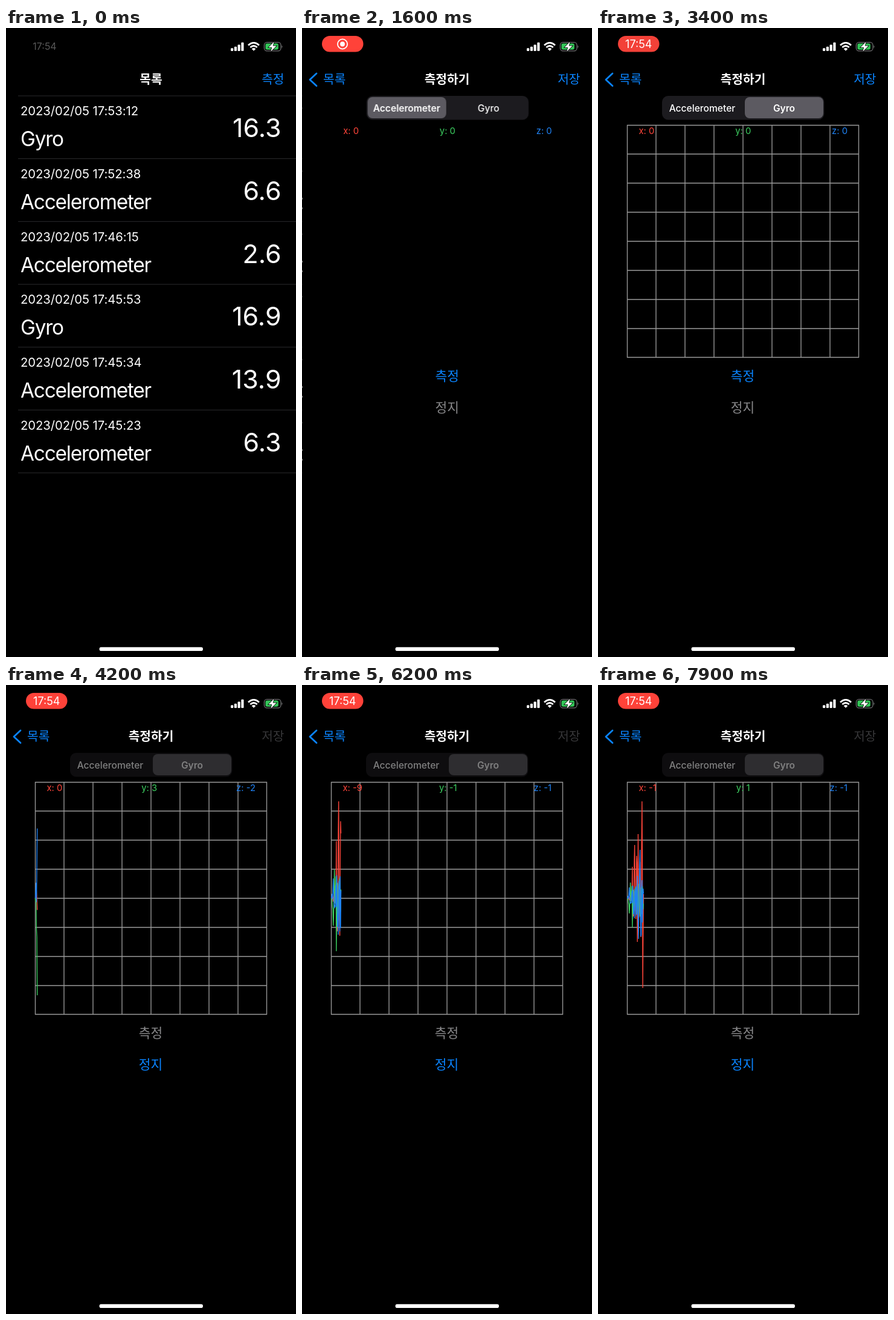
An HTML page that plays this animation: 480 px wide and 1038 px high, repeating every 8 s.

```html
<!DOCTYPE html>
<html lang="ko">
<head>
<meta charset="utf-8">
<title>측정</title>
<style>
  html, body { margin: 0; width: 100%; height: 100%; overflow: hidden; background: #000; }
  svg { display: block; width: 480px; height: 1038px; }
  text {
    font-family: Inter, "Noto Sans CJK KR", "Noto Sans CJK", sans-serif;
    font-optical-sizing: none;
    fill: #fff;
    white-space: pre;
  }
  .mid { text-anchor: middle; }
  .end { text-anchor: end; }
  .blue { fill: #0a84ff; }
  .ko { font-family: "Noto Sans CJK KR", "Noto Sans CJK", sans-serif; font-size: 20.3px; }
  .bold { font-weight: 700; }
  .button { font-size: 21.4px; }
  .date { font-size: 20.3px; letter-spacing: -.07px; }
  .name { font-size: 33.4px; letter-spacing: -.036em; }
  .value { font-size: 43px; }
  .axis { font-size: 14.8px; }
  .segment text { font-size: 15.6px; font-weight: 500; }

  .anim { animation: 8s linear infinite both; }
  .pill, .clock { transform-box: fill-box; transform-origin: center; }

  .clock { animation-name: clock; }
  @keyframes clock { 0% { opacity: .35 } 2%, 100% { opacity: 0; transform: scale(.9) } }
  .pill { animation-name: pill; }
  @keyframes pill {
    0%, 2% { opacity: 0; transform: scale(.6) }
    7%, 100% { opacity: 1; transform: none }
  }
  .pulse { animation: pulse 2s -.95s linear infinite; }
  @keyframes pulse { 0%, 100% { fill: #d63d35 } 25%, 75% { fill: #ff4239 } }
  .record { animation-name: record; }
  @keyframes record { 0%, 34% { opacity: 1 } 37%, 100% { opacity: 0 } }
  .time { animation-name: time; }
  @keyframes time { 0%, 35% { opacity: 0 } 38%, 100% { opacity: 1 } }

  .push { animation-timing-function: cubic-bezier(.28, .82, .32, 1); }
  .list { animation-name: list; }
  @keyframes list {
    0%, 14.375% { transform: none; opacity: 1 }
    20.625%, 100% { transform: translateX(-144px); opacity: .85 }
  }
  .detail { animation-name: detail; }
  @keyframes detail { 0%, 14.375% { transform: translateX(480px) } 20.625%, 100% { transform: none } }
  .old-title { animation-name: oldTitle; }
  @keyframes oldTitle {
    0%, 14.375% { transform: none; opacity: 1 }
    18.5%, 100% { transform: translateX(-186px); opacity: 0 }
  }
  .new-title { animation-name: newTitle; }
  @keyframes newTitle {
    0%, 14.375% { transform: translateX(200px); opacity: 0 }
    19.5%, 100% { transform: none; opacity: 1 }
  }
  .back { animation-name: back; }
  @keyframes back {
    0%, 14.375% { transform: translateX(110px); opacity: 0 }
    19.5%, 100% { transform: none; opacity: 1 }
  }
  .chevron, .save { animation-name: appear; }
  @keyframes appear { 0%, 15% { opacity: 0 } 19%, 100% { opacity: 1 } }
  .measure { animation-name: measure; }
  @keyframes measure {
    0%, 11.5% { opacity: 1 }
    13%, 15% { opacity: .4 }
    18%, 100% { opacity: 0 }
  }

  .chart { animation-name: chart; animation-timing-function: step-end; }
  @keyframes chart { 0% { visibility: hidden } 21%, 100% { visibility: visible } }
  .thumb { animation-name: thumb; animation-timing-function: ease-out; }
  @keyframes thumb { 0%, 28.75% { transform: none } 32%, 100% { transform: translateX(135px) } }
  .left, .right { animation-timing-function: step-end; }
  .left { animation-name: left; }
  @keyframes left { 0% { font-weight: 600 } 29%, 100% { font-weight: 500 } }
  .right { animation-name: right; }
  @keyframes right { 0% { font-weight: 500 } 29%, 100% { font-weight: 600 } }

  /* controls swap when measuring begins */
  .segment, .start, .stop, .save text { animation-timing-function: step-end; }
  .segment { animation-name: dim; }
  @keyframes dim { 0% { opacity: 1 } 45.7%, 100% { opacity: .5 } }
  .start { animation-name: start; }
  @keyframes start { 0% { fill: #0a84ff } 45.7%, 100% { fill: #88888a } }
  .stop { animation-name: stop; }
  @keyframes stop { 0% { fill: #88888a } 45.7%, 100% { fill: #0a84ff } }
  .save text { animation-name: save; }
  @keyframes save { 0% { fill: #0a84ff } 45.7%, 100% { fill: #363638 } }
</style>
</head>
<body>
<svg viewBox="0 0 480 1038">
  <g class="list anim push" id="list"></g>

  <g class="detail anim push">
    <rect y="100" width="480" height="938"/>
    <g class="segment anim">
      <rect x="106" y="112" width="268.5" height="39.5" rx="10" fill="#1c1b1f"/>
      <rect class="thumb anim" x="108" y="114" width="130" height="35" rx="8" fill="#5c5a61"/>
      <text class="mid left anim" x="172.5" y="137.5">Accelerometer</text>
      <text class="mid right anim" x="308" y="137.5">Gyro</text>
    </g>
    <g class="chart anim" fill="none" stroke-width="1.35">
      <path id="grid" stroke="#9a9a9a"/>
      <g id="lines" stroke-linejoin="bevel"></g>
    </g>
    <g id="axes"></g>
    <text class="ko button mid start anim" x="239.5" y="581.7">측정</text>
    <text class="ko button mid stop anim" x="239.5" y="633.7">정지</text>
  </g>

  <g>
    <text class="ko bold mid old-title anim push" x="240" y="92.3">목록</text>
    <text class="ko blue end measure anim" x="460.5" y="92.3">측정</text>
    <path class="chevron anim" d="M24 75L13 85.3L24 95.6" fill="none" stroke="#0a84ff" stroke-width="2.8" stroke-linecap="round" stroke-linejoin="round"/>
    <text class="ko blue back anim push" x="35" y="92.3">목록</text>
    <text class="ko bold mid new-title anim push" x="240" y="92.3">측정하기</text>
    <g class="save anim"><text class="ko end anim" x="460.5" y="92.3">저장</text></g>
  </g>

  <g>
    <text class="mid clock anim" x="64" y="36.5" font-size="16">17:54</text>
    <g class="pill anim">
      <rect class="pulse" x="33" y="13" width="68.5" height="26.5" rx="13.2"/>
      <g class="record anim">
        <circle cx="67" cy="26.5" r="8.1" fill="none" stroke="#fff" stroke-width="1.8"/>
        <circle cx="67" cy="26.5" r="3.9" fill="#fff"/>
      </g>
      <text class="mid time anim" x="67.3" y="33" font-size="18">17:54</text>
    </g>
    <g fill="#fff">
      <rect x="372" y="33.3" width="4.2" height="4.7" rx="1.2"/>
      <rect x="377.8" y="30.8" width="4.2" height="7.2" rx="1.2"/>
      <rect x="383.5" y="27.6" width="4.2" height="10.4" rx="1.2"/>
      <rect x="389.3" y="23.8" width="4.2" height="14.2" rx="1.2"/>
      <path d="M410 37.8L406.7 34.4Q410 31.8 413.3 34.4Z"/>
    </g>
    <g fill="none" stroke="#fff" stroke-width="2.7">
      <path d="M401 28.4Q410 20.4 419 28.4"/>
      <path d="M404.3 32Q410 27 415.7 32"/>
    </g>
    <rect x="427.4" y="23.6" width="27.6" height="14.2" rx="4.6" fill="none" stroke="#6d6d6f" stroke-width="1.3"/>
    <path d="M456.3 28.4Q459 30.7 456.3 33Z" fill="#6d6d6f"/>
    <rect x="429.4" y="25.6" width="21.4" height="10.2" rx="2.8" fill="#34c759"/>
    <path d="M443.6 22.6L434.6 32H440.2L438.2 39L447.6 29.4H441.8Z" fill="#fff" stroke="#000" stroke-width="1.5" paint-order="stroke"/>
  </g>
  <rect x="154.5" y="1021.8" width="171.5" height="6.2" rx="3.1" fill="#fff"/>
</svg>

<script>
const LOOP = 8000, STEP = 100, BEGIN = 3660;
const LEFT = 48.5, MIDDLE = 352, SAMPLE_WIDTH = .64, PEAK = 160, UNIT = 6.4;
const $ = id => document.getElementById(id);

const records = [
  ['17:53:12', 'Gyro', '16.3'],
  ['17:52:38', 'Accelerometer', '6.6'],
  ['17:46:15', 'Accelerometer', '2.6'],
  ['17:45:53', 'Gyro', '16.9'],
  ['17:45:34', 'Accelerometer', '13.9'],
  ['17:45:23', 'Accelerometer', '6.3']
];
const separator = y => `<path d="M20 ${y}H480" stroke="#2b2b2d"/>`;
$('list').innerHTML = separator(112) + records.map(([time, name, value], i) =>
  `<g transform="translate(0 ${i * 103.7})">
    <text class="date" x="24" y="144.4">2023/02/05 ${time}</text>
    <text class="name" x="24" y="195.2">${name}</text>
    <text class="value end" x="455.6" y="180.3">${value}</text>
    ${separator(215.6)}
  </g>`).join('');

let grid = 'M48.5 160.5H431.5V543.5H48.5Z';
for (let k = 1; k < 8; k++) grid += `M${48 + 48 * k} 160V544M48 ${160 + 48 * k}H432`;
$('grid').setAttribute('d', grid);

const axes = [
  { name: 'x', color: '#ff453a', anchor: 'start', x: 67.5, data: [
    0, 1, -1, -2, 0, 3, -3, 5, -6, 4, -5, 2, -6, -52, 10, 26, 30, -10, -60, -88, -30, 20,
    34, -20, -70, -59, 72, 20, -106, -20, 32, 20, -20, -60, 30, 64, 20, -90, -160, -60, 148, 60, -7] },
  { name: 'y', color: '#3ccf60', anchor: 'middle', x: 240, data: [
    0, 1, 0, 8, 10, 25, 18, -4, -26, -12, 4, 5, -20, 48, 12, -6, -14, 8, 20, 6, -12, -18,
    -4, 14, 10, -8, 16, 26, 10, -10, -24, -8, 14, 30, 12, -18, -8, 20, 26, -20, -12, 18, 9] },
  { name: 'z', color: '#1f82f5', anchor: 'end', x: 413, data: [
    0, -2, -4, 1, -8, -18, -6, 4, 9, 6, 8, -4, -12, 8, -21, -6, 26, 14, 33, -10, -16, 10,
    30, -20, 27, -7, -37, 10, 40, 67, 10, -20, -60, -80, 10, 63, 60, -20, -30, 40, 10, -16, -8] }
];

function add(parent, tag, attributes) {
  const node = document.createElementNS('http://www.w3.org/2000/svg', tag);
  for (const key in attributes) node.setAttribute(key, attributes[key]);
  return parent.appendChild(node);
}
for (const axis of axes) {
  axis.line = add($('lines'), 'polyline', { stroke: axis.color });
  axis.label = add($('axes'), 'text', {
    class: 'axis', x: axis.x, y: 174.6, style: `fill:${axis.color};text-anchor:${axis.anchor}`
  });
}

function draw(count) {
  const shown = axes.map(axis => axis.data.slice(0, count));
  const scale = PEAK / Math.max(1, ...shown.flat().map(Math.abs));
  axes.forEach((axis, k) => {
    const last = shown[k].at(-1) || 0;
    axis.line.setAttribute('points',
      shown[k].map((v, i) => `${LEFT + i * SAMPLE_WIDTH},${MIDDLE + v * scale}`).join(' '));
    axis.label.textContent = `${axis.name}: ${Math.trunc(last / UNIT) || 0}`;
  });
  // the middle label sits halfway between its neighbours
  const [x, y, z] = axes;
  const gapStart = x.x + x.label.getComputedTextLength();
  const gapEnd = z.x - z.label.getComputedTextLength();
  y.label.setAttribute('x', (gapStart + gapEnd) / 2);
}

const origin = performance.now();
let drawn = -1;
function tick() {
  const t = (performance.now() - origin) % LOOP;
  const count = Math.max(0, Math.floor((t - BEGIN) / STEP) + 1);
  if (count !== drawn) draw(drawn = count);
  requestAnimationFrame(tick);
}
tick();
</script>
</body>
</html>
```
